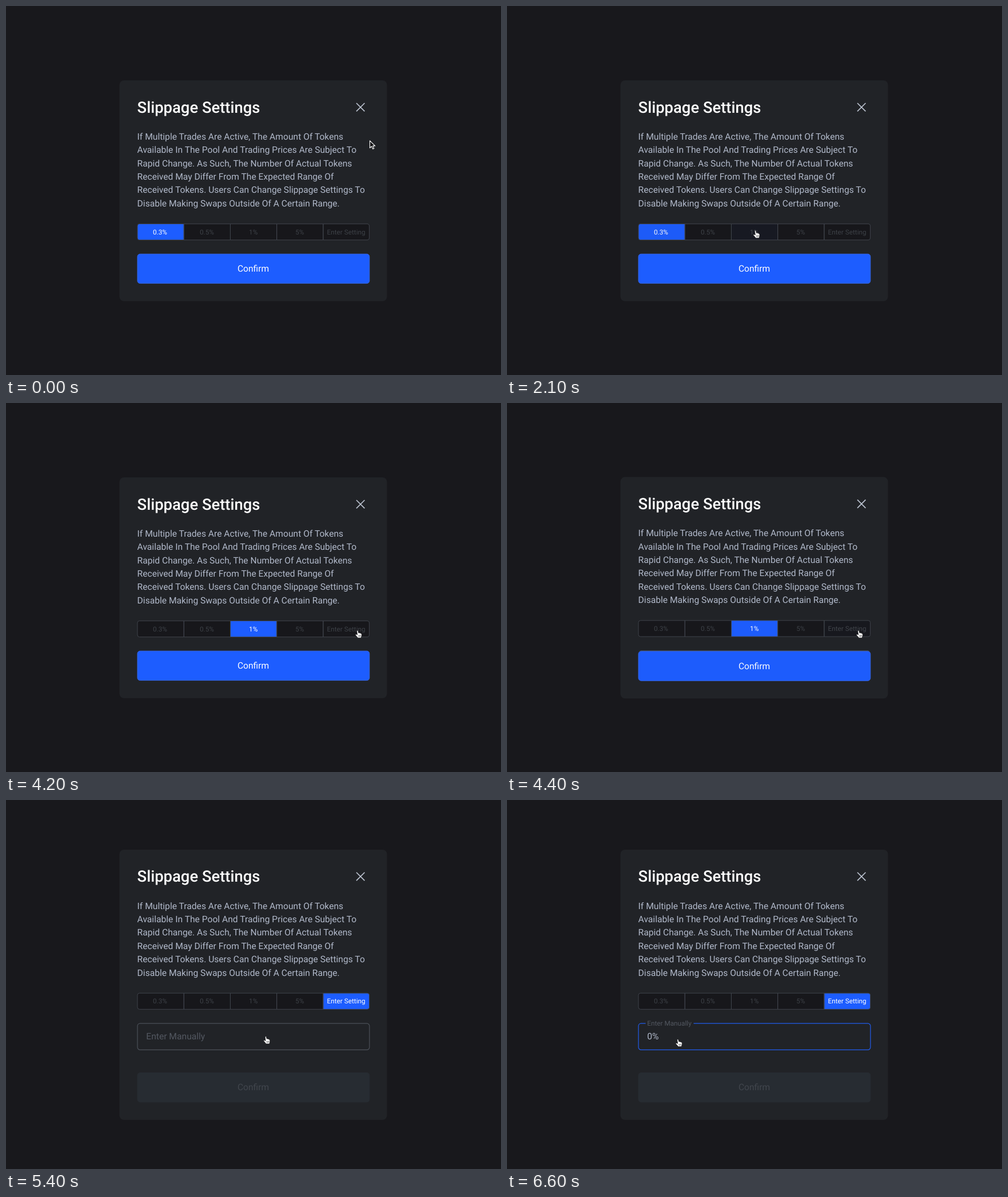
An HTML page for the animation above (7300 ms loop, 866 by 646 pixels).

```html
<!DOCTYPE html>
<html lang="en">
<head>
<meta charset="utf-8">
<title>Slippage Settings</title>
<style>
  html, body { margin: 0; width: 100%; height: 100%; overflow: hidden; background: #18181c; }
  svg { display: block; width: 866px; height: 646px; }
  text { font-family: Roboto, "Open Sans", sans-serif; font-size: 15.63px; text-rendering: geometricPrecision; }
  .title { font-size: 27.42px; font-weight: 500; fill: #fff; }
  .body { fill: #b1b9ca; }
  .cell { font-size: 11.75px; text-anchor: middle; }
  .mid { text-anchor: middle; }
</style>
</head>
<body>
<svg id="stage" viewBox="0 0 866 646">
  <defs><clipPath id="fold"><rect id="foldBox" x="220" width="426"/></clipPath></defs>
  <rect id="card" x="198.5" width="468" rx="7.8" fill="#212327"/>
  <g id="head">
    <text class="title" x="229.6" y="186.7">Slippage Settings</text>
    <path d="M613 170 l14.4 14.4 m0 -14.4 l-14.4 14.4" fill="none" stroke="#bcc3d0" stroke-width="1.7"/>
    <g id="copy" class="body"></g>
    <g id="cells"></g>
  </g>
  <g clip-path="url(#fold)">
    <g id="field">
      <path id="frame" fill="none" stroke-width="1.2"/>
      <text id="label" x="245.3" fill="#535861">Enter Manually</text>
      <text id="value" x="245.3" y="419.4" fill="#b1b9ca">0%</text>
    </g>
  </g>
  <g id="button">
    <rect id="face" x="230" y="434.2" width="405.8" height="51.4" rx="4.6"/>
    <text id="caption" class="mid" x="432.6" y="465.1">Confirm</text>
  </g>
  <path id="arrow" d="M0 .3 V13 L3 10.2 L5.2 14.8 L7.3 13.9 L5.2 9.4 H9.2 Z" fill="#111114" stroke="#fff" stroke-width="1.1" stroke-linejoin="round"/>
  <g id="hand">
    <path d="M-1.4 1.3 Q-.1 -.7 1 1.3 L1.7 4.6 Q3.1 3.7 3.7 5 Q5.1 4.3 5.7 5.7 Q7.2 5.3 7.4 7.2 Q7.6 10 6.2 13.4 H.5 Q-1.2 10.8 -3.8 8.4 Q-3.8 6.5 -1.6 7.3 L-.4 8 Z" fill="#fff" stroke="#111114" stroke-width=".8" stroke-linejoin="round"/>
    <path d="M1.6 8.6 l.5 3 M3.4 8.4 l.3 3 M5.2 8.3 v2.8" stroke="#333" stroke-width=".7" fill="none"/>
  </g>
</svg>
<script>
const LOOP = 7300, TICK = 100, GROW = 86.5;
const COPY = [
  'If Multiple Trades Are Active, The Amount Of Tokens',
  'Available In The Pool And Trading Prices Are Subject To',
  'Rapid Change. As Such, The Number Of Actual Tokens',
  'Received May Differ From The Expected Range Of',
  'Received Tokens. Users Can Change Slippage Settings To',
  'Disable Making Swaps Outside Of A Certain Range.'
];
const OPTIONS = ['0.3%', '0.5%', '1%', '5%', 'Enter Setting'];
const BLUE = [29, 93, 255], WHITE = [255, 255, 255];

// pointer hot spot: time, x, y
const TRAIL = [
  [0, 636.5, 235.5], [400, 636.5, 235.5], [800, 552, 290], [1200, 462, 356],
  [1300, 453.5, 367], [1400, 445, 378], [1700, 434.7, 392.8],
  [2700, 434.7, 392.8], [3000, 536, 400], [3300, 616, 397.6],
  [3600, 616, 397.6], [3700, 615.5, 397.4], [4100, 615.5, 397.4], [4200, 615, 397.8],
  [5000, 615, 397.8], [5400, 454.5, 413.5], [5800, 304.5, 418], [5900, 299, 418.4],
  [LOOP, 299, 418.4]
];

const $ = id => document.getElementById(id);
function make(parent, tag, attrs, text) {
  const el = document.createElementNS('http://www.w3.org/2000/svg', tag);
  set(el, attrs);
  if (text) el.textContent = text;
  parent.appendChild(el);
  return el;
}
function set(el, attrs) {
  for (const k in attrs) el.setAttribute(k, attrs[k]);
}
const mix = (a, b, p) => a + (b - a) * p;
const blend = (a, b, p) => `rgb(${a.map((v, i) => Math.round(mix(v, b[i], p)))})`;

// cubic-bezier(.4, 0, .2, 1)
function ease(x) {
  if (x <= 0) return 0;
  if (x >= 1) return 1;
  let lo = 0, hi = 1, u;
  for (let i = 0; i < 24; i++) {
    u = (lo + hi) / 2;
    const bx = 1.2 * u * (1 - u) ** 2 + 0.6 * u * u * (1 - u) + u ** 3;
    if (bx < x) lo = u; else hi = u;
  }
  return 3 * u * u * (1 - u) + u ** 3;
}
const phase = (t, start, length) => ease((t - start) / length);

// monotone cubic through the trail
function slope(i, k) {
  if (i < 1 || i > TRAIL.length - 2) return 0;
  const rate = j => (TRAIL[j + 1][k] - TRAIL[j][k]) / (TRAIL[j + 1][0] - TRAIL[j][0]);
  const a = rate(i - 1), b = rate(i);
  return a * b <= 0 ? 0 : 2 * a * b / (a + b);
}
function along(t, k) {
  let i = 0;
  while (i < TRAIL.length - 2 && TRAIL[i + 1][0] <= t) i++;
  const p = TRAIL[i], q = TRAIL[i + 1], h = q[0] - p[0], s = (t - p[0]) / h;
  return (1 + 2 * s) * (1 - s) ** 2 * p[k] + s * (1 - s) ** 2 * h * slope(i, k)
    + s * s * (3 - 2 * s) * q[k] + s * s * (s - 1) * h * slope(i + 1, k);
}

COPY.forEach((line, i) => make($('copy'), 'text', { x: 229.6, y: 233.8 + i * 23.4 }, line));

const W = 81.22, X = 230, Y = 381.4, H = 28.2, R = 3.6;
function cellPath(i) {
  const l = X + i * W, r = l + W, b = Y + H;
  if (i === 0) return `M${r} ${Y}V${b}H${l + R}a${R} ${R} 0 0 1 ${-R} ${-R}V${Y + R}a${R} ${R} 0 0 1 ${R} ${-R}Z`;
  if (i === 4) return `M${l} ${Y}H${r - R - .5}a${R} ${R} 0 0 1 ${R} ${R}V${b - R}a${R} ${R} 0 0 1 ${-R} ${R}H${l}Z`;
  return `M${l} ${Y}H${r}V${b}H${l}Z`;
}
const cells = OPTIONS.map((name, i) => ({ box: make($('cells'), 'path', { d: cellPath(i) }), name, i }));
cells.forEach(c => {
  make($('cells'), 'path', { d: cellPath(c.i), fill: 'none', stroke: '#3f434b' });
  c.text = make($('cells'), 'text', { class: 'cell', x: X + (c.i + .5) * W - (c.i ? .4 : 1.2), y: 399.7 }, c.name);
});

function fieldPath(gap) {
  const l = 230, r = 635.9, t = 391.2, b = 437.3, c = 4.6, left = 242.5;
  return `M${left + gap} ${t}H${r - c}a${c} ${c} 0 0 1 ${c} ${c}V${b - c}a${c} ${c} 0 0 1 ${-c} ${c}`
    + `H${l + c}a${c} ${c} 0 0 1 ${-c} ${-c}V${t + c}a${c} ${c} 0 0 1 ${c} ${-c}H${left}`;
}

function draw(t) {
  const pick = phase(t, 2050, 450);
  const open = phase(t, 4376, 320);
  const focus = phase(t, 6150, 430);
  const lift = open * GROW / 2;

  set($('card'), { y: 130.2 - lift, height: 386.5 + open * GROW });
  set($('head'), { transform: `translate(0 ${-lift})` });
  set($('button'), { transform: `translate(0 ${lift})` });
  set($('field'), { transform: `translate(0 ${GROW / 2 - lift})` });
  // headroom above the field for the raised label
  set($('foldBox'), { y: 423.8 - lift, height: open * GROW + 10 * Math.sign(open) });

  const on = [1 - pick, 0, pick * (1 - open), 0, open];
  cells.forEach(c => {
    set(c.box, { fill: blend([23, 23, 27], BLUE, on[c.i]) });
    set(c.text, { fill: blend([61, 65, 71], WHITE, on[c.i]) });
  });

  set($('face'), {
    fill: blend(BLUE, [39, 44, 50], open),
    stroke: blend([54, 104, 238], [39, 44, 50], open)
  });
  set($('caption'), { fill: blend(WHITE, [65, 70, 77], open) });

  set($('frame'), { d: fieldPath(84 * focus), stroke: blend([75, 80, 88], [33, 92, 236], focus) });
  set($('label'), { y: mix(419.4, 395.1, focus) });
  $('label').style.fontSize = mix(15.63, 11.75, focus) + 'px';
  set($('value'), { opacity: focus });

  const x = along(t, 1), y = along(t, 2), link = y > 381 && t > 1200;
  const at = `translate(${x.toFixed(2)} ${y.toFixed(2)})`;
  set($('arrow'), { transform: at, visibility: link ? 'hidden' : 'visible' });
  set($('hand'), { transform: at, visibility: link ? 'visible' : 'hidden' });
}

const begin = performance.now();
function loop() {
  const t = (performance.now() - begin) % LOOP;
  draw(Math.floor(t / TICK) * TICK);
  requestAnimationFrame(loop);
}
loop();
</script>
</body>
</html>
```
